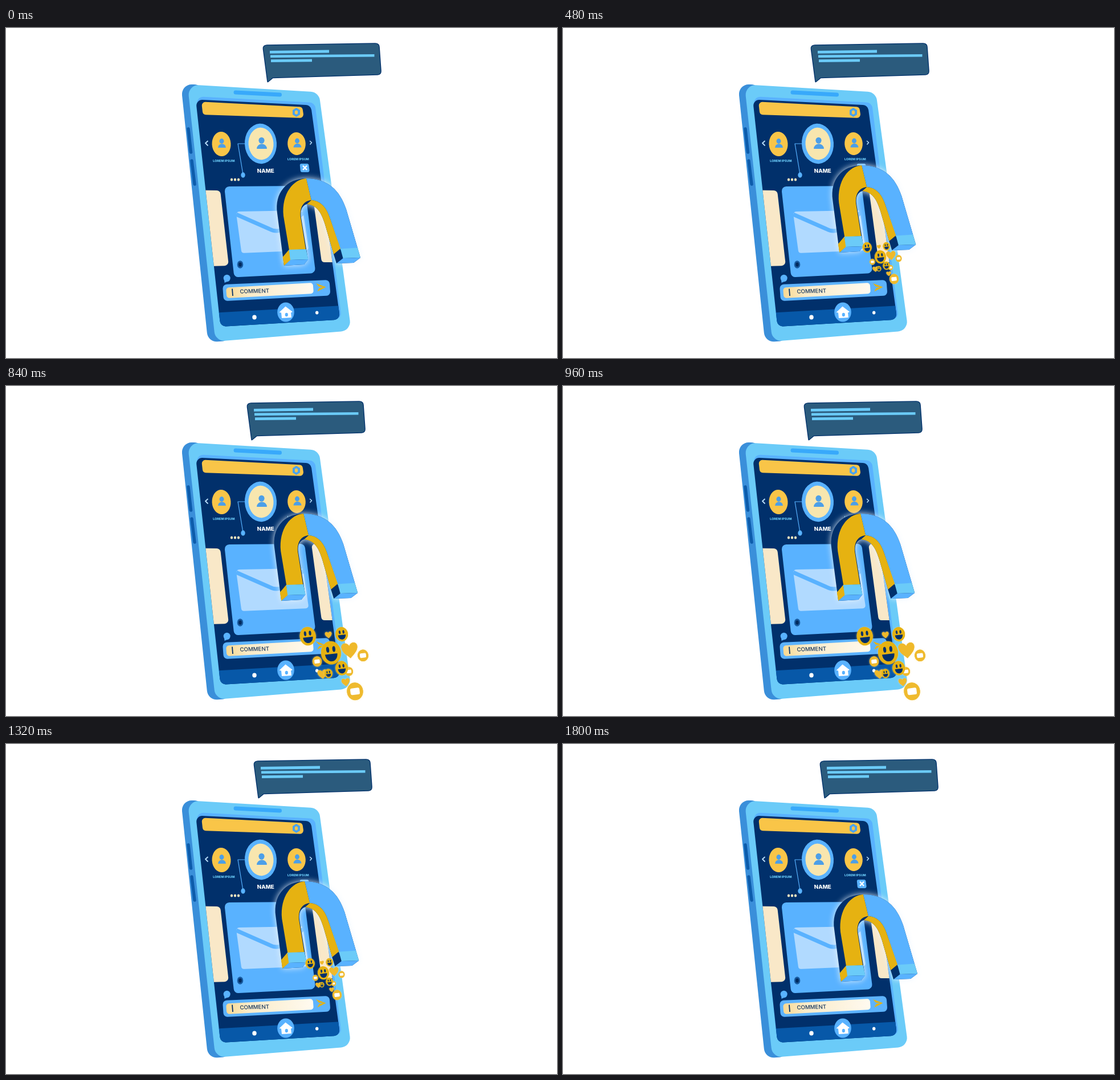
An HTML page with a canvas for the animation above (1830 ms loop, 967 px wide and 579 px high).

```html
<!DOCTYPE html>
<html lang="en">
<head>
<meta charset="utf-8">
<title>Social magnet</title>
<style>
html, body { margin: 0; width: 100%; height: 100%; overflow: hidden; background: #fff; }
canvas { display: block; }
</style>
</head>
<body>
<canvas id="stage" width="967" height="579"></canvas>
<script>
const ctx = document.getElementById('stage').getContext('2d');
const LOOP = 1830, STEP = 30, HALF = 30;
const NAVY = '#01306b', SKY = '#59b2ff', CYAN = '#6bcbf8', GOLD = '#e6b211',
  AMBER = '#f9c548', CREAM = '#f9e8c8', DEEP = '#0758a8', WHITE = '#fff';
const FONT = 'Inter, "Open Sans", sans-serif';

function fill(d, color) {
  ctx.fillStyle = color;
  ctx.fill(new Path2D(d));
}

function line(d, color, width, cap = 'butt') {
  ctx.strokeStyle = color;
  ctx.lineWidth = width;
  ctx.lineCap = cap;
  ctx.lineJoin = 'round';
  ctx.stroke(new Path2D(d));
}

function oval(x, y, rx, ry, color, tilt = 0) {
  ctx.fillStyle = color;
  ctx.beginPath();
  ctx.ellipse(x, y, rx, ry, tilt, 0, 7);
  ctx.fill();
}

// Polygon with rounded corners; pts is a flat x, y list.
function panel(pts, r, color) {
  const n = pts.length;
  ctx.beginPath();
  ctx.moveTo((pts[0] + pts[n - 2]) / 2, (pts[1] + pts[n - 1]) / 2);
  for (let i = 0; i < n; i += 2)
    ctx.arcTo(pts[i], pts[i + 1], pts[(i + 2) % n], pts[(i + 3) % n], r);
  ctx.closePath();
  ctx.fillStyle = color;
  ctx.fill();
}

function label(text, x, y, size, weight, color, slope = 0) {
  ctx.save();
  ctx.translate(x, y);
  ctx.transform(1, slope, 0.08, 1, 0, 0);
  ctx.font = `${weight} ${size}px ${FONT}`;
  ctx.textAlign = 'center';
  ctx.fillStyle = color;
  ctx.fillText(text, 0, 0);
  ctx.restore();
}

function person(x, y, s) {
  oval(x, y - 4.5 * s, 4 * s, 4.4 * s, '#4c9fe8');
  ctx.beginPath();
  ctx.ellipse(x + 0.5, y + 7 * s, 7 * s, 6.8 * s, 0, Math.PI, 0);
  ctx.fill();
}

function drawBody() {
  panel([307, 99, 345, 99, 396, 549, 354.5, 551], 17, '#3a8fda');
  panel([318.5, 99, 549, 112.5, 606, 531, 367.5, 550], 17, CYAN);
  line('M403 113L480.5 117', '#38a9fb', 7, 'round');
  line('M320 177L324.5 218', '#0d5cab', 5.5, 'round');
  line('M326 233L331 274', '#0d5cab', 5.5, 'round');
  panel([334, 120, 542, 131, 589, 511, 376, 523], 11, SKY);
}

function drawProfiles() {
  panel([343, 129.5, 520, 138.5, 523, 158, 345.5, 152], 6, AMBER);
  fill('M509.5 140L516 144V152L509.5 156L503 152V144Z', '#4aa3ee');
  oval(509.5, 148, 2.7, 3.5, AMBER);

  line('M420 203H407L416 257', SKY, 1.2);
  oval(416, 258, 3.7, 4.7, SKY);
  oval(378, 203.5, 16.5, 21.5, AMBER, -0.06);
  oval(510, 203, 15.8, 20, AMBER, -0.06);
  oval(447, 203, 28, 35.2, SKY, -0.06);
  oval(447.5, 203, 22, 28.3, '#f8e6ae', -0.06);
  person(378.5, 203, 1);
  person(511, 202.5, 1);
  person(448.5, 203, 1.27);
  line('M354.5 198L350 202L354.5 206.5', '#b9dffb', 1.8);
  line('M533 198L536.5 201L533.5 204.5', '#b9dffb', 1.5);

  label('LOREM IPSUM', 382.5, 234.5, 5.5, 800, CYAN);
  label('LOREM IPSUM', 513, 231.5, 5.4, 800, CYAN);
  label('NAME', 456, 254, 9.7, 800, WHITE);
  for (const x of [396, 402, 408]) oval(x, 266, 2.2, 2.5, '#f8e6c0');
  panel([515.5, 238, 531, 238, 533, 253, 517, 253], 3, SKY);
  line('M521 241.5L528 249M528 241.5L521 249', WHITE, 2.4);
}

function drawCards() {
  panel([330, 284.5, 376, 285, 391, 417, 340, 418.5], 7, CREAM);
  panel([536, 277, 580, 276, 595, 411, 554, 411], 6, CREAM);
  panel([383, 278, 524, 277, 543.5, 430, 400.5, 437.5], 8, SKY);
  panel([403.5, 322, 521, 320, 531.5, 390, 413.5, 395], 5, '#b1daff');
  line('M404 327L462 352.5Q472 358 481 355L524 323', SKY, 7);
  oval(411, 415, 5.3, 6.7, '#185a9f');
  oval(411, 415, 2.8, 3.7, '#012a5e');
}

function drawFooter() {
  oval(387.7, 439, 6, 6.2, SKY);
  fill('M383 441L383.5 447L390 444Z', SKY);
  panel([380, 450, 567.5, 442, 569.5, 469.5, 382, 479], 7, '#5db3fd');
  const g = ctx.createLinearGradient(387, 0, 540, 0);
  g.addColorStop(0, '#f9d993');
  g.addColorStop(0.25, '#faebc8');
  g.addColorStop(1, '#fffaf0');
  panel([386, 455.5, 538.5, 447, 540, 466, 387.5, 474], 5, g);
  line('M397 457.5L398 470', NAVY, 1.8);
  label('COMMENT', 436.5, 465, 9.7, 500, '#17375f', -0.025);
  fill('M544 448L561.5 454.5L546 462.5L550 456L557 454.8L549 453.7Z', GOLD);

  fill('M360 500L590 487V530H360Z', DEEP);
  oval(436, 507.5, 3.7, 4, WHITE);
  oval(545.7, 499.5, 2.7, 3, WHITE);
  oval(491, 498.5, 14.8, 17, SKY);
  fill('M479.5 499L490.5 488.5L503 498L500 499.5L501 508L484 509L483 499.5Z', WHITE);
  oval(492.3, 503, 2.6, 3.2, SKY);
}

function drawPhone() {
  drawBody();
  ctx.save();
  panel([333, 125.5, 535, 135.5, 586.5, 511.5, 376.5, 524], 10, NAVY);
  ctx.clip();
  drawProfiles();
  drawCards();
  drawFooter();
  ctx.restore();
}

function drawBubble() {
  const d = 'M452 37Q451 31 458 30.5L648 27.5Q654 27.5 654.5 33L657.5 75' +
    'Q658 81 652 81.5L468 87L459.5 94Z';
  line(d, NAVY, 2.6);
  fill(d, '#2b5b7d');
  line('M463 42.3L567 41', CYAN, 4.8);
  line('M464 49.8L646.5 48.2', CYAN, 4.4);
  line('M465 57.6L537 56.8', CYAN, 4.8);
}

function drawMagnet() {
  ctx.save();
  ctx.shadowColor = 'rgba(235,246,255,0.95)';
  ctx.shadowBlur = 11;
  fill('M486 402L476 325C471 290 492 264 527 264C565 264 586 285 597 318L622 403' +
    'L610 412L580 413L575 397L560 345C553 322 545 311 528 309C519 312 516 320 518 333' +
    'L530 406L523 415L488 417Z', NAVY);
  ctx.restore();
  fill('M497 390L487 330C483 290 505 265 527 264L536 302C522 303 515 315 517 332L526 388Z', GOLD);
  fill('M527 264C565 264 586 285 597 318L617 386L587 389L569 335C562 312 550 303 536 302Z', SKY);
  fill('M536 302C550 303 562 312 569 335L587 387L575 397L560 345C553 322 545 311 528 309Z', GOLD);
  fill('M485.5 402L496.5 389L500 407L488 417Z', GOLD);
  fill('M496.5 389L526.5 388L530.5 406L499 407Z', CYAN);
  fill('M499 407L530.5 406L523 415L488 417Z', SKY);
  fill('M587 387.5L617 385.5L622 403L591.5 404Z', CYAN);
  fill('M591.5 404L622 403L610 412L580 413Z', SKY);
}

const icons = {
  face() {
    oval(0, 0, 1, 1.17, GOLD);
    oval(-0.3, -0.35, 0.15, 0.29, NAVY);
    oval(0.32, -0.35, 0.15, 0.29, NAVY);
    fill('M-.62 .12H.62C.6 .62 .3 .86 0 .86S-.6 .62 -.62 .12Z', NAVY);
  },
  note() {
    oval(0, 0, 1, 1.09, '#efba2e');
    panel([-0.58, -0.42, 0.58, -0.42, 0.58, 0.42, -0.58, 0.42], 0.2, WHITE);
  },
  heart() {
    fill('M0 1C-.4 .6 -1 .2 -1 -.4C-1 -1 -.25 -1.1 0 -.5C.25 -1.1 1 -1 1 -.4C1 .2 .4 .6 0 1Z', '#efb92a');
  }
};

// kind, offset from the origin at unit spread, radius
const swarm = [
  ['heart', 23, 106, 5], ['heart', 49, 177, 6], ['heart', 14, 165, 7],
  ['face', 23, 164, 6], ['note', 54, 161, 6], ['note', 6, 146, 7],
  ['face', 43, 156, 9.3], ['face', 43, 105, 9.3], ['note', 75, 137, 8],
  ['heart', 55, 129, 12], ['face', -8, 108, 12], ['note', 63, 191, 12],
  ['face', 27, 133, 15]
];

function drawSwarm(spread) {
  if (!spread) return;
  for (const [kind, dx, dy, r] of swarm) {
    ctx.save();
    ctx.translate(539 + dx * spread, 313 + dy * spread);
    ctx.rotate(-0.12);
    ctx.scale(r * spread, r * spread);
    ctx.save();
    ctx.shadowColor = 'rgba(255,226,150,0.75)';
    ctx.shadowBlur = 3 * spread;
    if (kind === 'heart') icons.heart();
    else oval(0, 0, 1, 1.1, GOLD);
    ctx.restore();
    icons[kind]();
    ctx.restore();
  }
}

function shifted(x, y, draw) {
  ctx.save();
  ctx.translate(x, y);
  draw();
  ctx.restore();
}

function render(ms) {
  const k = Math.floor((ms % LOOP) / STEP);
  const u = k <= HALF ? k : 2 * HALF - k;
  ctx.fillStyle = WHITE;
  ctx.fillRect(0, 0, 967, 579);
  shifted(-u, 0, drawBubble);
  drawPhone();
  shifted(-0.17 * u, -1.43 * u, drawMagnet);
  drawSwarm(u / 24);
}

let start;
function tick(now) {
  start ??= now;
  render(now - start);
  requestAnimationFrame(tick);
}
render(0);
requestAnimationFrame(tick);
</script>
</body>
</html>
```
